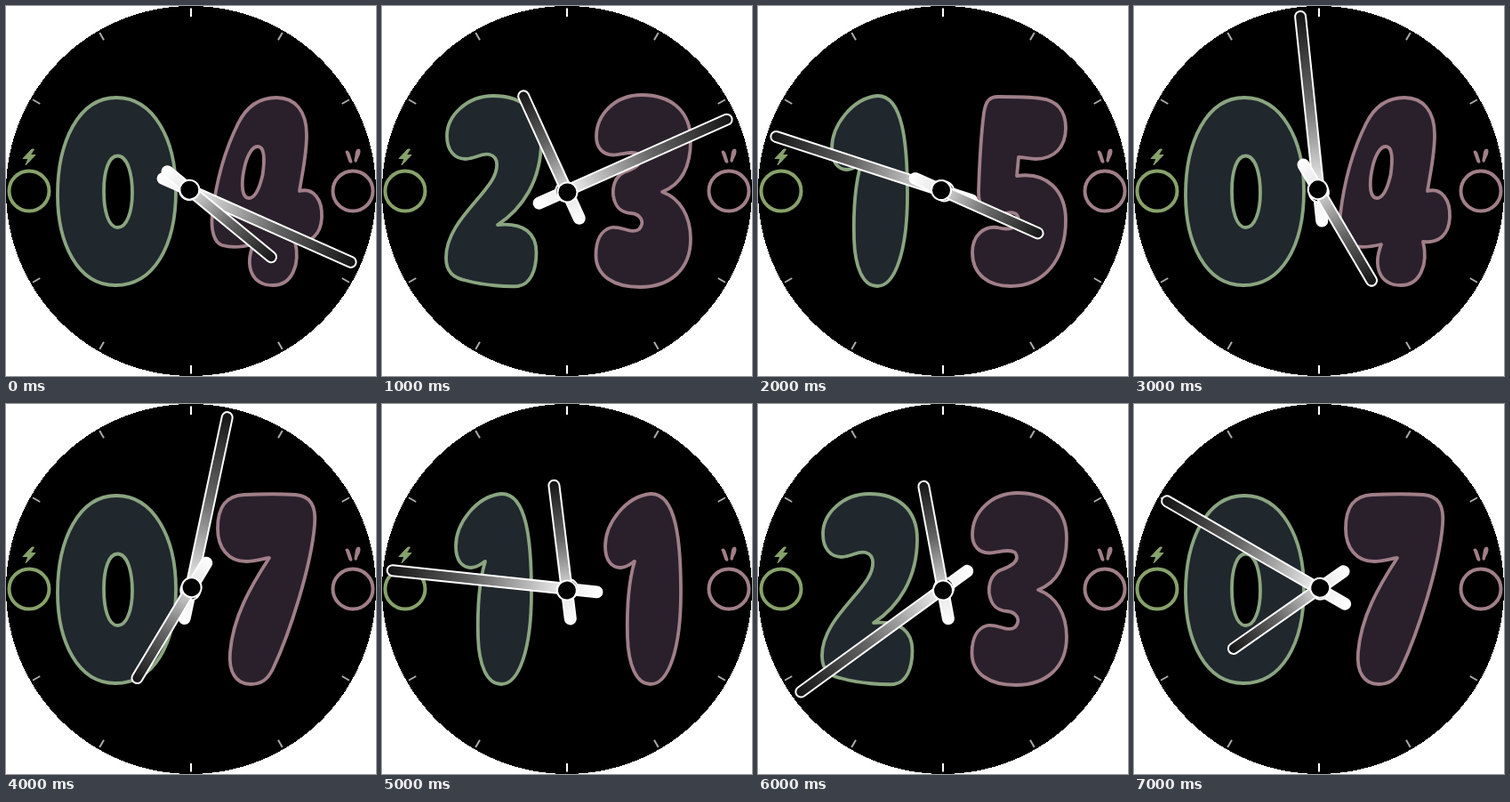
Recreate the animation shown at these times as an HTML page. Size 416 px wide and 416 px high, loop 8000 ms.

```html
<!DOCTYPE html>
<html lang="en">
<head>
<meta charset="utf-8">
<title>Watch face</title>
<style>
  html, body { margin: 0; height: 100%; overflow: hidden; background: #fff; }
  svg { display: block; width: 100vw; height: 100vh; }
  .digit { stroke-width: 3.8; stroke-linejoin: round; fill-rule: evenodd; }
  .left { fill: #20272d; stroke: #8aa580; }
  .right { fill: #2a202b; stroke: #a07f88; }
  .ring { fill: none; stroke-width: 4; }
  .hand rect { fill: url(#shade); stroke: #fff; stroke-width: 2; }
  .hand circle { fill: #000; stroke: #fff; stroke-width: 2; }
</style>
</head>
<body>
<svg viewBox="0 0 416 416">
  <defs>
    <linearGradient id="shade" x1="0" y1="0" x2="0" y2="1">
      <stop offset="0" stop-color="#131313"/>
      <stop offset=".4" stop-color="#646464"/>
      <stop offset=".8" stop-color="#e8e8e8"/>
      <stop offset="1" stop-color="#fff"/>
    </linearGradient>
    <!-- Digits 3, 4, 5 and 7 are drawn in the right slot, 168 px further on -->
    <path id="d0" d="M124 103C166 103 191 150 191 208C191 270 166 314 123 314C80 314 58 266 58 212C58 152 82 103 124 103Z
      M125.500 168.500C137 168.500 142 190 142 210C142 231 136 249 125.500 249C115 249 110 230 110 208C110 187 115 168.500 125.500 168.500Z"/>
    <path id="d1" d="M134 101C106 104 83 134 83 160C83 177 91 184 100 184C107 184 111 180 116 177C110 197 107 225 108 262
      C109 294 118 315 134 315C154 315 168 276 168 212C168 155 163 100 134 101Z"/>
    <path id="d2" d="M125 101C96 101 73 123 73 146C73 163 82 172 94 172C105 172 112 165 121 167C132 170 131 184 123 197
      C107 222 72 248 72 283C72 299 80 306 96 309C115 314 140 316 153 315C167 313 173.500 297 173.500 277
      C173.500 256 160 243 130 246C158 228 179 196 179 152C179 118 157 101 125 101Z"/>
    <path id="d3" transform="translate(-168)" d="M292 100C262 100 241 122 241 147C241 160 249 167.500 260 167.500C270 167.500 281 162 289 167
      C296 177 283 183 272 187C262 192 259 203 260 213C262 226 268 232 280 233C291 234 296 243 289 251
      C280 257 270 247 258 249C246 252 240.500 264 240.500 280C240.500 303 260 316 290 316C324 316 347 296 347 262
      C347 236 335 216 315 209C336 201 347 181 347 151C347 118 325 100 292 100Z"/>
    <path id="d4" transform="translate(-168)" d="M304 103C325 103 338 118 338 145C338 168 333 188 330 208C346 204 356 218 355 238
      C354 257 343 267 325 265C331 290 322 314 300 314C277 314 268 294 278 268C266 271 253 272 243 269
      C234 266 230 252 232 234C236 200 246 162 261 132C271 112 285 103 304 103Z
      M283 158C291 158 291 173 288.500 190C285 205 280 216 273 216C265.500 216 264.500 202 267 187C270 170 276 158 283 158Z"/>
    <path id="d5" transform="translate(-168)" d="M270 102C285 102 305 102 318 104C336 106 346 118 346 137C346 159 333 172 312 172
      C305 172 299 170 293 170L291 191C325 186 346 208 346 241C346 287 320 315 284 315C258 315 241 301 241 277
      C241 258 254 247 269 249C280 252 292 251 293 241C293 231 284 231 275 234C259 237 247 228 248 208
      C249 178 250 150 254 120C256 107 260 102 270 102Z"/>
    <path id="d7" transform="translate(-168)" d="M268 102C290 101 310 101 325 102C342 103 349 114 347 136C343 183 319 258 300 298
      C294 310 287 315 275 315C259 315 250 302 252 279C255 240 275 205 296 173C288 174 281 177 270 177
      C250 177 238 162 238 140C238 116 247 103 268 102Z"/>
  </defs>

  <circle cx="208" cy="208" r="208" shape-rendering="crispEdges"/>
  <g id="ticks" stroke-width="2"></g>

  <circle class="ring" cx="26" cy="208" r="22.5" stroke="#87a26b"/>
  <path d="M29 161L19 171.500H25L22 179L33 167.500H27.500L31.500 161Z" fill="#87a26b" stroke="#87a26b" stroke-linejoin="round"/>
  <circle class="ring" cx="390" cy="208" r="22.5" stroke="#a07f88"/>
  <path d="M381.500 164C383 161 386 163 387 167L389.500 175C389 178 386 177 385 174Z
    M393 164C394 160 398 159 398.500 163C398.500 168 395.500 171 395 174C394 177 391 176 391.500 173Z" fill="#a07f88"/>

  <use id="tens" class="digit left"/>
  <use id="units" class="digit right" x="168"/>

  <g id="minute" class="hand">
    <rect x="-6" y="-203" width="12" height="243" rx="6"/>
    <circle cy="1.8" r="11"/>
  </g>
  <g id="hour" class="hand">
    <rect x="-6" y="-123" width="12" height="163" rx="6"/>
    <circle cy="1.8" r="11"/>
  </g>
</svg>
<script>
  const TIMES = ["04:19", "23:11", "15:48", "04:59", "07:02", "11:46", "23:39", "07:50"];
  const STEP = 1000;
  const byId = id => document.getElementById(id);

  // Hour ticks, except where the side rings sit
  byId("ticks").innerHTML = Array.from({ length: 12 }, (_, i) => i % 6 === 3 ? "" :
    `<path d="M208 2.5V12" stroke="${i % 6 ? "#aaa" : "#fff"}" transform="rotate(${i * 30} 208 208)"/>`).join("");

  function turn(id, degrees) {
    byId(id).setAttribute("transform", `translate(207.7 207.8) rotate(${degrees})`);
  }

  function showTime(time) {
    const [hours, minutes] = time.split(":").map(Number);
    byId("tens").setAttribute("href", "#d" + time[0]);
    byId("units").setAttribute("href", "#d" + time[1]);
    turn("minute", minutes * 6);
    turn("hour", hours * 30 + minutes / 2);
  }

  let shown;
  function frame() {
    const time = TIMES[Math.floor(performance.now() / STEP) % TIMES.length];
    if (time !== shown) showTime(shown = time);
    requestAnimationFrame(frame);
  }
  frame();
</script>
</body>
</html>
```
